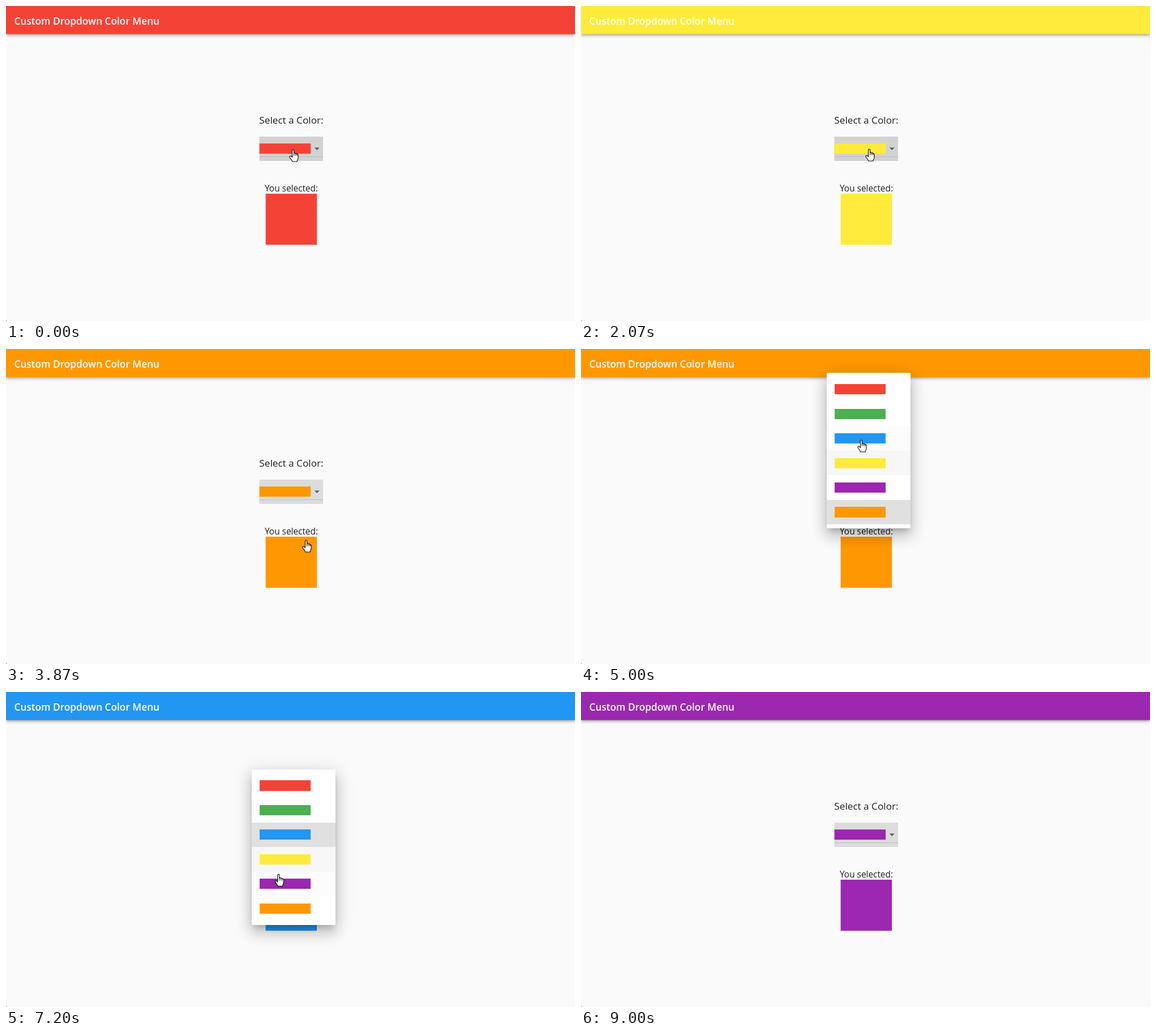
These frames come from a looping animation (1005x557 px, 9870 ms). An HTML page:

```html
<!DOCTYPE html>
<html lang="en">
<head>
<meta charset="utf-8">
<title>Custom Dropdown Color Menu</title>
<style>
  html, body { margin: 0; width: 100%; height: 100%; overflow: hidden; background: #fafafa; }
  #stage { position: relative; width: 1005px; height: 557px; overflow: hidden; background: #fafafa; }
  #stage > svg { position: absolute; left: 0; top: 0; width: 1005px; height: 557px; }
  #shadow { position: absolute; left: 0; top: 0; width: 1005px; height: 49px;
    box-shadow: 0 2px 4px -1px rgba(0,0,0,.22), 0 3.5px 4.5px rgba(0,0,0,.16), 0 1px 9px rgba(0,0,0,.12); }
  text { font-family: "Open Sans", "Noto Sans", sans-serif; fill: #212121; }
  #menu { position: absolute; left: 0; top: 0; }
  #panel { position: absolute; left: 433.6px; width: 148.4px; background: #fff; border-radius: 2px;
    box-shadow: 0 7.2px 10.5px -4.5px rgba(0,0,0,.2), 0 14.5px 25px 1.8px rgba(0,0,0,.14),
      0 5.4px 31px 4.5px rgba(0,0,0,.12); }
  .row { position: absolute; left: 433.6px; width: 148.4px; height: 43.43px; }
  .row i { position: absolute; left: 14.4px; top: 12.65px; width: 90.5px; height: 18.1px; }
</style>
</head>
<body>
<div id="stage">
  <div id="shadow"></div>
  <svg viewBox="0 0 1005 557">
    <rect class="pick" width="1005" height="49.6" />
    <text x="14.5" y="33" font-size="17.25" font-weight="600" style="fill:#fff">Custom Dropdown Color Menu</text>
    <text x="504" y="208" font-size="17.2" text-anchor="middle">Select a Color:</text>
    <text x="504" y="327.5" font-size="15.4" text-anchor="middle">You selected:</text>
    <rect id="button" x="447.5" y="231" width="112.5" height="43" />
    <rect x="447.5" y="266" width="112.5" height="1" fill="#bdbdbd" />
    <rect class="pick" x="447.6" y="243.1" width="90.5" height="18.1" />
    <path d="M544.7 250.3H553.7L549.2 254.9Z" fill="#616161" />
    <rect class="pick" x="458.6" y="331.9" width="90.5" height="90.3" />
    <path d="M0 555L1.5 557H0Z" fill="#777" />
  </svg>
  <div id="menu"><div id="panel"></div></div>
  <svg viewBox="0 0 1005 557">
    <g id="cursor" fill="#fff" stroke="#000" stroke-linejoin="round" stroke-linecap="round">
      <g id="hand">
        <path stroke-width="1.1" d="M-1.5 1.5Q-1.5 0 0 0Q1.5 0 1.5 1.5V7Q1.5 5.8 2.8 5.8Q4.2 5.8 4.2 7.2
          Q4.4 6.5 5.6 6.6Q6.8 6.8 6.8 8.2Q7.4 7.6 8.3 8Q9 8.4 9 9.6V14Q9 17 7.5 19L6.8 21H-1.2L-2 19.2
          L-5.6 14Q-6.6 12 -5 11.3Q-3.6 10.9 -2.4 12.4L-1.5 13.5Z" />
        <path fill="none" stroke-width=".9" d="M1.5 7V10.5M4.2 7.2V10.5M6.8 8.2V10.8" />
      </g>
      <path id="arrow" d="M.5 .5V16.5L4.1 13.1L6.5 18.6L8.8 17.6L6.4 12.2H11.3Z" />
    </g>
  </svg>
</div>
<script>
const LOOP = 9870, STEP = LOOP / 148;
const COLORS = ['#f44336', '#4caf50', '#2196f3', '#ffeb3b', '#9c27b0', '#ff9800'];
const ROW = 43.43, PAD = 7.24, HOME = 230.65, MAX_LIFT = 181;
const OPENING = 300, FADE = 75, PRESS = 88, RETURN = 300;
const START = [507, 254];

// Each visit: open the menu, glide to a row, pick it, then go to the rest point.
const VISITS = [
  { open: 430,  reach: 1070, aim: [489, 383], close: 1610, to: 3, leave: 1740, rest: [509, 253] },
  { open: 2570, reach: 3333, aim: [530, 338], close: 3790, to: 5, leave: 4040, rest: [488, 244] },
  { open: 4450, reach: 5000, aim: [495, 161], close: 5780, to: 2, leave: 5800, rest: [494, 247] },
  { open: 6500, reach: 7240, aim: [481, 324], close: 7780, to: 4, leave: 8720, rest: [20, 590] }
];
VISITS.forEach((m, i) => m.from = i ? VISITS[i - 1].to : 0);

const GLIDES = VISITS.flatMap(m => [
  { start: m.open + OPENING, end: m.reach, to: m.aim },
  { start: m.leave, end: m.leave + RETURN, to: m.rest }
]);

const $ = id => document.getElementById(id);
const clamp = v => Math.min(1, Math.max(0, v));
const span = (v, a, b) => clamp((v - a) / (b - a));
const lerp = (a, b, k) => a + (b - a) * k;
const ease = k => k * k * (3 - 2 * k);
const shade = a => `rgba(0,0,0,${a})`;

const rows = COLORS.map(color => {
  const row = document.createElement('div');
  row.className = 'row';
  row.append(document.createElement('i'));
  row.firstChild.style.background = color;
  $('menu').append(row);
  return row;
});
const picks = document.querySelectorAll('.pick');

function pointer(t) {
  return GLIDES.reduce((p, g) => {
    const k = ease(span(t, g.start, g.end));
    return [lerp(p[0], g.to[0], k), lerp(p[1], g.to[1], k)];
  }, START);
}

function drawMenu(t, visit) {
  $('menu').style.display = visit ? '' : 'none';
  if (!visit) return;
  const v = span(t, visit.open, visit.open + OPENING);
  const grow = span(v, .25, .5);
  const first = HOME - Math.min(visit.from * ROW, MAX_LIFT);
  const top = lerp(first + visit.from * ROW, first - PAD, grow);
  const bottom = lerp(first + (visit.from + 1) * ROW, first + rows.length * ROW + PAD, grow);
  $('menu').style.opacity = span(v, 0, .25) - span(t, visit.close, visit.close + FADE);
  $('panel').style.top = top + 'px';
  $('panel').style.height = bottom - top + 'px';

  const press = visit.close - PRESS;
  const unit = .5 / (rows.length + 1.5);
  rows.forEach((row, i) => {
    const y = first + i * ROW, start = .5 + (i + 1) * unit;
    let tint = 0;
    // Hover follows the pointer with a short trail.
    for (let k = 1; k <= 4; k++) {
      const past = t - 40 * k, py = pointer(past)[1];
      if (past > visit.open && py >= y && py < y + ROW) tint += .01;
    }
    if (t < press && i === visit.from) tint += .12;
    if (i === visit.to) tint += .12 * span(t, press, press + 50);
    row.style.top = y + 'px';
    row.style.background = shade(tint);
    row.style.opacity = i === visit.from ? 1 : span(v, start, start + 1.5 * unit);
  });
}

function draw(t) {
  const visit = VISITS.find(m => t >= m.open && t < m.close + FADE);
  const color = COLORS[VISITS.reduce((c, m) => t >= m.close ? m.to : c, 0)];
  const [x, y] = pointer(t), [px, py] = pointer(t - STEP);
  const onButton = x > 447 && x < 560 && y > 231 && y < 274;
  const arrow = !visit && !onButton && (x !== px || y !== py);

  picks.forEach(p => p.setAttribute('fill', color));
  $('button').setAttribute('fill', shade(onButton ? .16 : .12));
  drawMenu(t, visit);
  $('cursor').setAttribute('transform', `translate(${x.toFixed(1)} ${y.toFixed(1)})`);
  $('hand').style.display = arrow ? 'none' : '';
  $('arrow').style.display = arrow ? '' : 'none';
}

const began = performance.now();
function tick() {
  const t = (performance.now() - began) % LOOP;
  draw(Math.floor((t + 4) / STEP) % 148 * STEP);
  requestAnimationFrame(tick);
}
tick();
</script>
</body>
</html>
```
